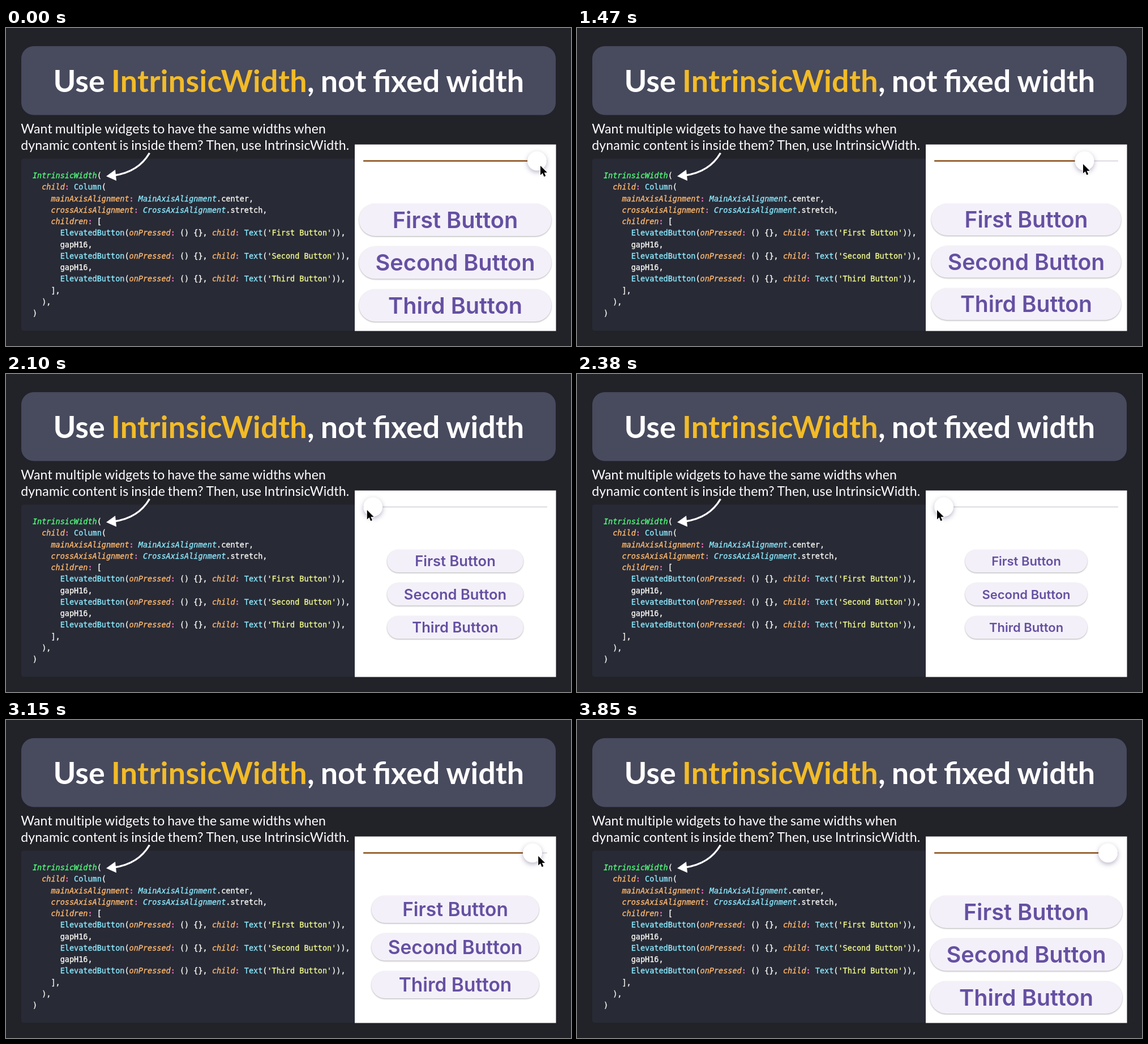
Write an HTML page with a canvas that moves like this. It is 998 px wide and 561 px high and loops after 4.2 s.

```html
<!DOCTYPE html>
<html lang="en">
<head>
<meta charset="utf-8">
<title>IntrinsicWidth</title>
<style>
  html, body { margin: 0; width: 100%; height: 100%; overflow: hidden; background: #222229; }
  canvas { display: block; }
</style>
</head>
<body>
<canvas id="stage" width="998" height="561"></canvas>
<script>
const ctx = document.getElementById('stage').getContext('2d');
const LOOP = 4200, STEP = 70;
const LATO = 'Lato, sans-serif';
const MONO = '"DejaVu Sans Mono", monospace';
const INTER = 'Inter, sans-serif';
const WHITE = '#ffffff';

// Smooth step from 0 to 1 between times a and b
function ease(t, a, b) {
  const u = Math.min(1, Math.max(0, (t - a) / (b - a)));
  return u * u * (3 - 2 * u);
}

// Slider value: dragged down to 0, then back up to 1
const sliderValue = t => 1 - ease(t, 1270, 2110) + ease(t, 2560, 3215);

// The label size chases the slider; each change restarts a linear tween
function labelValue(t) {
  const TWEEN = 205, DT = 10;
  let v = 1, target = 1, rate = 0;
  for (let time = 0; time < t; time += DT) {
    const s = sliderValue(time);
    if (s !== target) {
      target = s;
      rate = (s - v) / TWEEN;
    }
    const move = rate * DT;
    v = Math.abs(target - v) <= Math.abs(move) ? target : v + move;
  }
  return v;
}

// The pointer drags the thumb, then leaves to the right
function cursorAt(t) {
  const drag = ease(t, 2469, 3198) - ease(t, 1240, 2140);
  return [944 + 308 * drag + 40 * ease(t, 3200, 3500), 243 - 3 * ease(t, 0, 560)];
}

function setFont(weight, size, family, letter = 0, word = 0) {
  ctx.font = `${weight} ${size}px ${family}`;
  ctx.letterSpacing = `${letter * size}px`;
  ctx.wordSpacing = `${word * size}px`;
}

// Visible width of a text in the current font
function inkWidth(text) {
  const m = ctx.measureText(text);
  return m.actualBoundingBoxRight + m.actualBoundingBoxLeft;
}

function box(x, y, w, h, r, color) {
  ctx.fillStyle = color;
  ctx.beginPath();
  ctx.roundRect(x, y, w, h, r);
  ctx.fill();
}

function shadow(color, blur, dy) {
  ctx.shadowColor = color;
  ctx.shadowBlur = blur;
  ctx.shadowOffsetY = dy;
}

// Lays out the title runs from x and returns their total width
function titleRuns(size, x, paint) {
  const runs = [['Use ', WHITE, 0], ['IntrinsicWidth', '#f2bb28', 0.006], [', not fixed width', WHITE, 0]];
  let end = x;
  for (const [text, color, letter] of runs) {
    setFont(700, size, LATO, letter, -0.035);
    ctx.fillStyle = color;
    if (paint) ctx.fillText(text, end, 113);
    end += ctx.measureText(text).width;
  }
  return end - x;
}

function drawTitle() {
  box(27, 32, 944, 121.5, 22, '#484a5e');
  const width = 832;
  titleRuns(100 * width / titleRuns(100, 0, false), 499.5 - width / 2, true);
}

function drawIntro() {
  const lines = ['Want multiple widgets to have the same widths when',
    'dynamic content is inside them? Then, use IntrinsicWidth.'];
  const font = size => setFont(400, size, LATO, 0.006, -0.05);
  font(100);
  font(100 * 578.5 / inkWidth(lines[1]));
  ctx.fillStyle = WHITE;
  lines.forEach((line, i) => ctx.fillText(line, 26.3, 186.4 + i * 28.5));
}

const code = `IntrinsicWidth(
  child: Column(
    mainAxisAlignment: MainAxisAlignment.center,
    crossAxisAlignment: CrossAxisAlignment.stretch,
    children: [
      ElevatedButton(onPressed: () {}, child: Text('First Button')),
      gapH16,
      ElevatedButton(onPressed: () {}, child: Text('Second Button')),
      gapH16,
      ElevatedButton(onPressed: () {}, child: Text('Third Button')),
    ],
  ),
)`;

// Returns [color, italic] for a code token
function tokenStyle(token, next) {
  if (token === 'IntrinsicWidth') return ['#50fa7b', true];
  if (token === ':') return ['#ff79c6', false];
  if (token[0] === "'") return ['#f1fa8c', false];
  if (/^\w/.test(token) && next === ':') return ['#ffb86c', true];
  if (/^[A-Z]/.test(token)) return ['#8be9fd', next === '.'];
  return ['#f8f8f2', false];
}

function drawCode() {
  box(27, 230.5, 600, 303.5, 4, '#282a36');
  const size = 13.5;
  setFont('normal', size, MONO);
  const pitch = ctx.measureText('0').width;
  ctx.lineWidth = 0.35;
  code.split('\n').forEach((line, row) => {
    for (const m of line.matchAll(/'[^']*'|\w+|[^\w\s]/g)) {
      const [color, italic] = tokenStyle(m[0], line[m.index + m[0].length]);
      const x = 46.9 + m.index * pitch, y = 265.2 + row * 20.25;
      setFont(italic ? 'italic' : 'normal', size, MONO);
      ctx.fillStyle = ctx.strokeStyle = color;
      ctx.fillText(m[0], x, y);
      ctx.strokeText(m[0], x, y);
    }
  });
}

function drawArrow() {
  ctx.strokeStyle = ctx.fillStyle = WHITE;
  ctx.lineWidth = 3.4;
  ctx.beginPath();
  ctx.moveTo(253.5, 220.5);
  ctx.quadraticCurveTo(234, 254, 191, 260);
  ctx.stroke();
  ctx.beginPath();
  ctx.moveTo(177, 261.5);
  ctx.lineTo(193, 250);
  ctx.lineTo(195, 269.5);
  ctx.fill();
}

function drawSlider(value) {
  const x = 648 + 290 * value, y = 234.5;
  box(631, y - 1.25, 325, 2.5, 1, '#e3e0e6');
  box(631, y - 1.25, x - 631, 2.5, 1, '#8d5218');
  ctx.save();
  shadow('rgba(70, 55, 105, 0.38)', 9, 3);
  box(x - 17, y - 17, 34, 34, 17, WHITE);
  ctx.restore();
}

function drawButtons(value) {
  const labels = ['First Button', 'Second Button', 'Third Button'];
  const textWidth = 154 + 124 * value;
  const w = textWidth + 61.7, h = Math.max(40, textWidth * 0.205);
  setFont(600, 100, INTER);
  const size = 100 * textWidth / inkWidth(labels[1]);
  setFont(600, size, INTER);
  ctx.textAlign = 'center';
  labels.forEach((label, i) => {
    const y = 310 + i * (h + 18.5);
    ctx.save();
    shadow('rgba(0, 0, 0, 0.32)', 2.5, 1);
    box(793.5 - w / 2, y, w, h, h / 2, '#f4f0f9');
    ctx.restore();
    ctx.fillStyle = '#6550a2';
    ctx.fillText(label, 793.5, y + h / 2 + size * 0.365);
  });
  ctx.textAlign = 'left';
}

const pointer = new Path2D('M0 0V16.6L3.8 13 6.4 19.2 9.2 18 6.6 12H11.9Z');

function drawCursor([x, y]) {
  ctx.save();
  ctx.translate(x, y);
  ctx.strokeStyle = WHITE;
  ctx.lineWidth = 2;
  ctx.lineJoin = 'round';
  ctx.stroke(pointer);
  ctx.fillStyle = '#000000';
  ctx.fill(pointer);
  ctx.restore();
}

function draw(t) {
  ctx.fillStyle = '#222229';
  ctx.fillRect(0, 0, 998, 561);
  drawTitle();
  drawIntro();
  drawCode();
  drawArrow();

  ctx.save();
  ctx.beginPath();
  ctx.rect(616, 205.5, 355.5, 329);
  ctx.fillStyle = WHITE;
  ctx.fill();
  ctx.clip();
  drawSlider(sliderValue(t));
  drawButtons(labelValue(t));
  drawCursor(cursorAt(t));
  ctx.restore();
}

const start = performance.now();
function frame() {
  const t = Math.max(0, performance.now() - start) % LOOP;
  draw(Math.floor(t / STEP) * STEP);
  requestAnimationFrame(frame);
}
frame();
</script>
</body>
</html>
```
